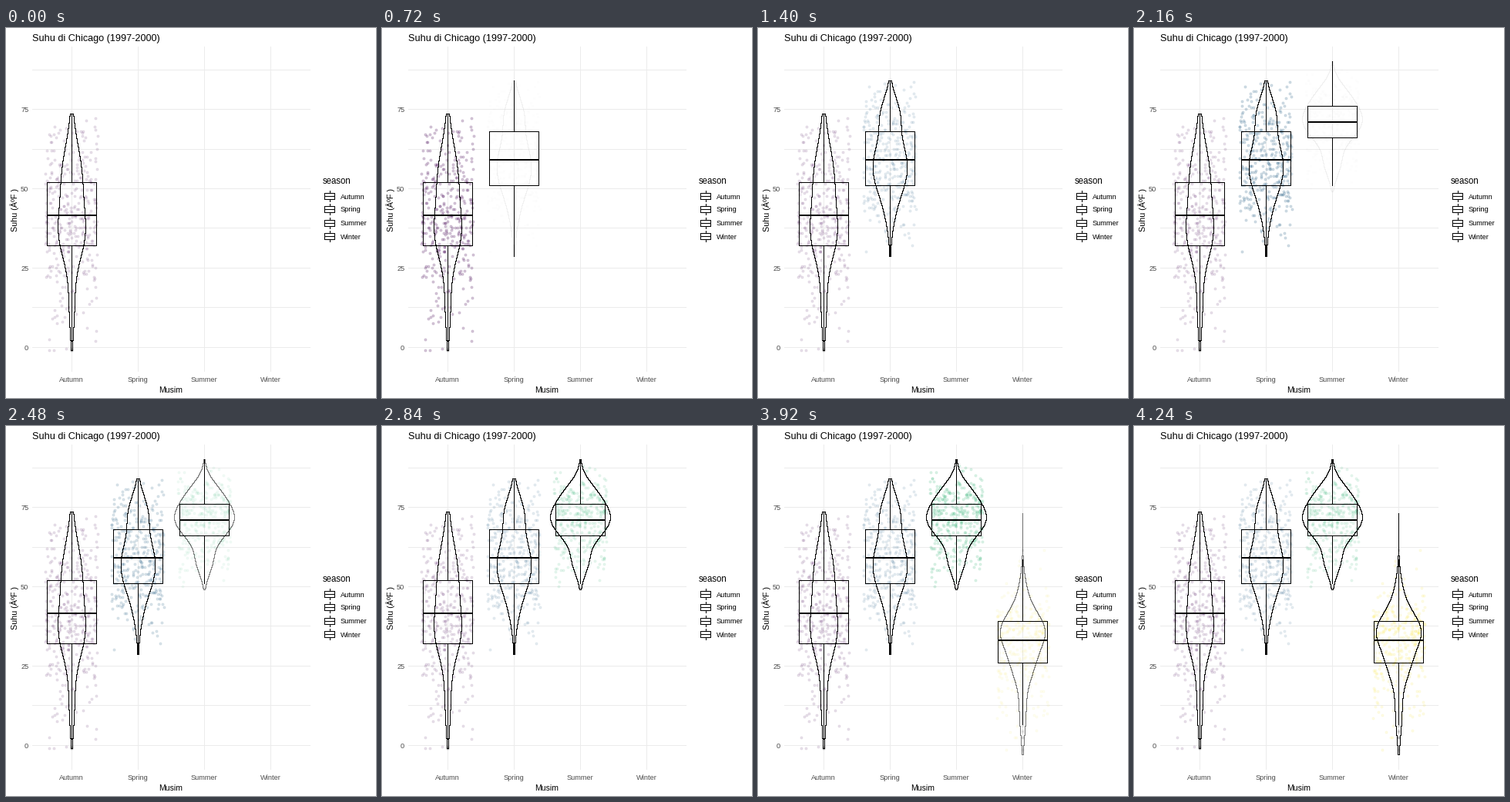
A matplotlib script that plays this animation: 480 by 480 pixels, repeating every 5000 ms.

```python
import numpy as np
import matplotlib.pyplot as plt
from matplotlib.animation import FuncAnimation
from matplotlib.patches import Polygon, Rectangle

plt.rcParams["font.family"] = "Liberation Sans"
SIZE, DPI = 480, 96
PT = 72 / DPI              # points per pixel
FRAMES, INTERVAL = 125, 40
POINT_ALPHA, DAYS = 0.1, 365
GRID, GREY = "#ebebeb", "#4d4d4d"

# When each season starts to enter, and how many frames that takes.
ENTER = [(0, 1), (18, 18), (54, 18), (90, 17)]

# span and quartiles in degrees; bells are (half width, mean, spread),
# summed to give the violin's outline
SEASONS = [
    dict(name="Autumn", color="#440154", span=(-1, 73.5), quartiles=(32, 41.5, 52),
         bells=[(13, 53, 11), (13.5, 35, 8), (3.5, 14, 9)]),
    dict(name="Spring", color="#31688e", span=(28.7, 84), quartiles=(51, 59, 68),
         bells=[(10, 74, 5.5), (22, 57, 8.5), (3, 42, 7)]),
    dict(name="Summer", color="#35b779", span=(49, 90), quartiles=(66, 71, 76),
         bells=[(38, 71.5, 6), (9, 80.5, 4), (8.5, 57.5, 4.2)]),
    dict(name="Winter", color="#fde725", span=(-3, 73), quartiles=(26, 33, 39),
         bells=[(25, 36.5, 5.5), (13, 26, 6), (4, 10, 7), (5, 47, 6)]),
]

rng = np.random.default_rng(1997)


def row(temp):
    return 413.8 - 4.116 * np.asarray(temp, float)


def column(i):
    return 85 + 86 * i


fig = plt.figure(figsize=(SIZE / DPI, SIZE / DPI), dpi=DPI, facecolor="white")
ax = fig.add_axes([0, 0, 1, 1])
ax.set_xlim(0, SIZE)
ax.set_ylim(SIZE, 0)
ax.axis("off")


def line(xs, ys, color="black", width=1, z=4):
    return ax.plot(xs, ys, color=color, lw=width * PT, zorder=z,
                   antialiased=False, solid_capstyle="butt")[0]


def label(x, y, text, size, color="black", ha="left", va="baseline", rot=0):
    ax.text(x, y, text, fontsize=size * PT, color=color, ha=ha, va=va,
            rotation=rot, zorder=6)


def frame_box(x, top, w, h):
    return ax.add_patch(Rectangle((x, top), w, h, fill=False, ec="black",
                                  lw=PT, antialiased=False, zorder=4))


def dots(xs, ys, color):
    return ax.scatter(xs, ys, s=(3 * PT) ** 2, facecolor=color,
                      edgecolor=color, linewidth=PT, zorder=2)


def half_width(temps, bells):
    return sum(h * np.exp(-((temps - mean) / spread) ** 2 / 2)
               for h, mean, spread in bells)


def sample(season):
    """Half-degree readings that follow the violin's density."""
    temps = np.linspace(*season["span"], 400)
    cdf = np.cumsum(half_width(temps, season["bells"]))
    picks = np.interp(rng.random(DAYS), cdf / cdf[-1], temps)
    return np.round(picks * 2) / 2


def draw_violin(x, season):
    """One-pixel outline that moves in whole pixels, row by row."""
    low, high = season["span"]
    rows = np.arange(round(float(row(high))), round(float(row(low))) + 1)
    widths = np.round(half_width((413.8 - rows) / 4.116, season["bells"]))
    ys, ws = np.repeat(rows, 2)[1:], np.repeat(widths, 2)[:-1]
    ring = np.c_[np.r_[x - ws, (x + ws)[::-1]], np.r_[ys, ys[::-1]]]
    return ax.add_patch(Polygon(ring, fill=False, ec="black", lw=PT, snap=True,
                                antialiased=False, zorder=3))


def draw_season(i, season):
    x, (q1, mid, q3) = column(i), season["quartiles"]
    reach = 1.5 * (q3 - q1)
    low = max(season["span"][0], q1 - reach)
    high = min(season["span"][1], q3 + reach)

    temps = sample(season)
    xs = x + rng.uniform(-34.3, 34.3, DAYS)
    live, mark = (dots(xs, row(temps), season["color"]) for _ in range(2))
    mark.set_alpha(POINT_ALPHA)
    outliers = temps[(temps < low) | (temps > high)]

    box = [frame_box(x - 32, row(q3), 64, row(q1) - row(q3)),
           line([x - 32, x + 32], row([mid, mid]), width=2),
           line([x, x], row([q3, high])),
           line([x, x], row([q1, low]))]
    return dict(live=live, mark=mark, box=box, violin=draw_violin(x, season),
                outliers=dots(np.full(len(outliers), x), row(outliers), "black"))


def draw_static():
    for temp in np.arange(0, 88, 12.5):
        line([34, 394], [row(temp)] * 2, GRID, z=1)
    for temp in (0, 25, 50, 75):
        label(29.3, row(temp) + 4, str(temp), 9.3, GREY, "right")
    for i, season in enumerate(SEASONS):
        x = column(i)
        line([x, x], [24, 445], GRID, z=1)
        label(x, 459, season["name"], 9.3, GREY, "center")

        y = round(217.8 + 17.4 * i)
        frame_box(413, y - 4, 13, 8)
        line([413, 426], [y, y])
        line([420, 420], [y - 7, y - 4])
        line([420, 420], [y + 4, y + 7])
        label(434, y + 3.5, season["name"], 9.3)

    label(34, 17, "Suhu di Chicago (1997-2000)", 12.65)
    label(214, 473, "Musim", 10.5, ha="center")
    label(11.5, 235.5, "Suhu (ÂºF )", 10.8, ha="center", va="center", rot=90)
    label(411, 202.5, "season", 11.5)


def progress(frame, i):
    """Share of season i's entrance that is done, 0 before it starts."""
    if i >= len(ENTER):
        return 0.0
    start, length = ENTER[i]
    return float(np.clip((frame - start + 1) / length, 0, 1))


draw_static()
layers = [draw_season(i, season) for i, season in enumerate(SEASONS)]


def update(frame):
    for i, layer in enumerate(layers):
        shown, leaving = progress(frame, i), progress(frame, i + 1)
        layer["live"].set_alpha(POINT_ALPHA * shown * (1 - leaving))
        layer["mark"].set_visible(leaving > 0)
        layer["outliers"].set_alpha(POINT_ALPHA * shown)
        layer["violin"].set_alpha(shown)
        for part in layer["box"]:
            part.set_visible(shown > 0)
    return []


anim = FuncAnimation(fig, update, frames=FRAMES, interval=INTERVAL,
                     repeat=True, repeat_delay=0, blit=False)
plt.show()
```
